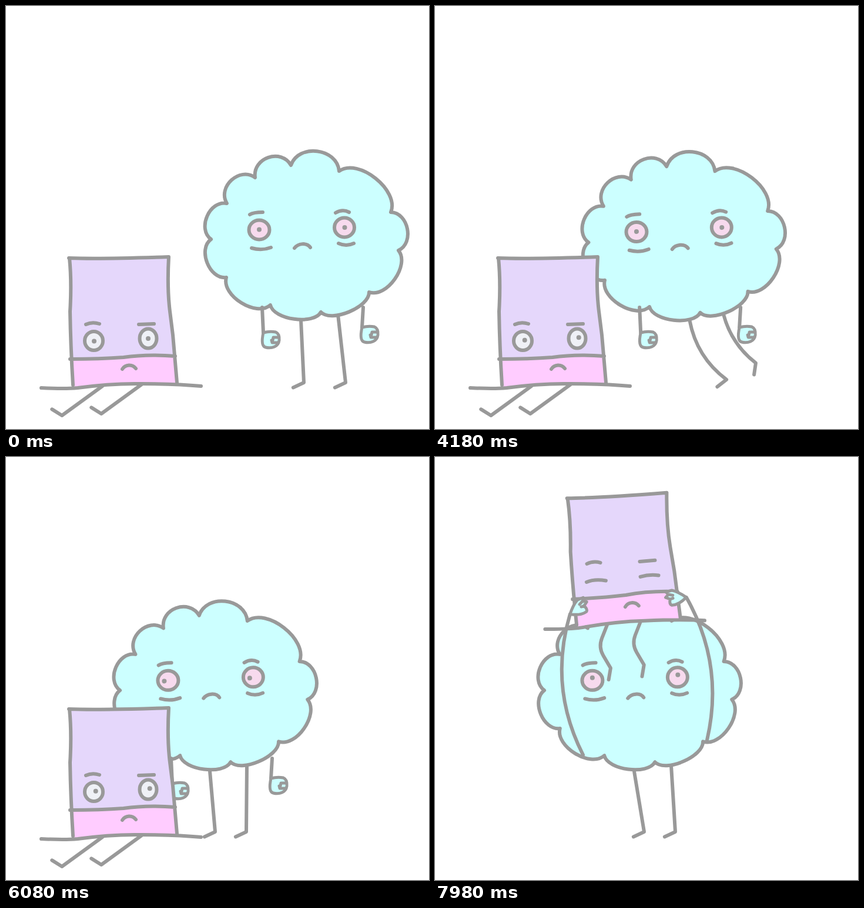
Animation, 720 px wide and 720 px high, one loop 8 s. Source, as an HTML page:

```html
<!DOCTYPE html>
<html lang="en">
<head>
<meta charset="utf-8">
<title>Cloud picks up hat</title>
<style>
  html, body { margin: 0; width: 100%; height: 100%; overflow: hidden; background: #fff; }
  svg { display: block; width: 100vw; height: 100vh; }
  path, ellipse { fill: none; stroke: #999; stroke-width: 6; stroke-linecap: round; stroke-linejoin: round; }
  .cloud, .hand { fill: #cff; }
  .hand { stroke-width: 5; }
  .felt { fill: #e5d7fb; stroke: none; }
  .band { fill: #fcf; stroke: none; }
  .eye circle { fill: #999; }
  .pink ellipse { fill: #f7daee; }
  .pale ellipse { fill: #eff1f6; }
</style>
</head>
<body>
<svg viewBox="0 0 720 720">
  <path id="leg0"/><path id="leg1"/>
  <g id="cloud">
    <path id="outline" class="cloud"/>
    <path d="M415 355Q421 351 437 351M561 352Q573 345 584 351M418 412Q435 417 451 411M566 404Q579 410 592 404M491 412C497 404 512 402 518 411"/>
    <g id="cloudOpen" class="eye pink">
      <ellipse cx="431" cy="381" rx="17.5" ry="16.5"/><ellipse cx="576" cy="377" rx="17" ry="16.5"/>
      <g id="cloudPupils"><circle cx="431" cy="380.5" r="4"/><circle cx="576.5" cy="377" r="4"/></g>
    </g>
    <path id="cloudShut" d="M413 387Q430 379 453 385M558 379Q580 370 601 381"/>
  </g>
  <path id="arm0"/>
  <g id="behind"></g>
  <g id="hat">
    <path id="hatLeg0"/><path id="hatLeg1"/>
    <path class="felt" d="M108 429L277 427Q273 480 279 520L288 596L240 595Q180 602 111 601Q107 520 108 429Z"/>
    <path class="band" d="M111 601Q180 602 240 595L287 596L291 642Q200 640 114 649Z"/>
    <path d="M107 429Q160 431 277 427Q274 480 279 520L284 560L291 641M108 429Q112 470 109 520Q110 580 114 645M109 601Q160 601 200 598Q240 592 288 596M60 650Q100 652 122 650Q180 642 230 643Q290 643 332 647"/>
    <path d="M136 542Q147 537 159 541M226 542L252 541M198 618C203 610 215 609 221 617"/>
    <g id="hatOpen" class="eye pale">
      <ellipse cx="149.5" cy="570" rx="15.5" ry="16"/><ellipse cx="242" cy="566" rx="14.5" ry="16.5"/>
      <g id="hatPupils"><circle cx="150" cy="570.5" r="4"/><circle cx="242" cy="566" r="4"/></g>
    </g>
    <path id="hatShut" d="M134 573Q148 568 167 572M226 568Q242 564 257 567"/>
  </g>
  <path id="arm1"/>
  <g id="front"><path id="hand1" class="hand"/><path id="hand0" class="hand"/></g>
</svg>
<script>
const LOOP = 8000, BEAT = 100, RAD = Math.PI / 180;
const FIST = 'M0 0Q-5 23 4 25Q12 27 19 24Q26 21 27 13Q28 2 21-1Q11-3 0 0ZM25 8H17L16 13M24 17H15L14 13';
const GRIP = 'M0 0Q-3 18-13 25Q-18 26-21 18L-29 20L-28 13L-34 12L-27 4Q-18 0 0 0ZM-21 18L-18 14M-28 13L-21 10';
// Notch x, y and height of the puff that follows it
const PUFFS = [[485,271,29], [567,281,29], [655,351,22], [668,416,23], [618,487,18], [536,521,18],
               [450,509,23], [375,462,21], [349,397,22], [376,336,24], [424,292,25]];
const GLANCES = [[720, 910], [2200, 2700], [5250, 5720], [5920, 6280]];
const CLOUD_BLINKS = [[1000, 1160], [3040, 3140], [4980, 5140]];
const HAT_BLINKS = [[1720, 1880], [7980, LOOP]];

const el = {};
document.querySelectorAll('[id]').forEach(e => el[e.id] = e);

const clamp = v => Math.max(0, Math.min(1, v));
const mix = (a, b, p) => a.map((v, i) => v + (b[i] - v) * p);
// Rises from 0 to 1 in n equal held steps, the first at time a
const ramp = (t, a, n) => clamp((Math.floor((t - a) / BEAT) + 1) / n);
const within = (spans, t) => spans.some(([a, b]) => t >= a && t < b);
const move = (e, x, y, more = '') => e.setAttribute('transform', `translate(${x} ${y}) ${more}`);

function drawOutline() {
  const d = PUFFS.map(([x, y, height], i) => {
    const [u, v] = PUFFS[(i + 1) % PUFFS.length];
    const k = height * 4 / 3 / Math.hypot(u - x, v - y), nx = (v - y) * k, ny = (x - u) * k;
    const [a, b] = [.1, .9].map(p => [x + (u - x) * p + nx, y + (v - y) * p + ny]);
    return `C${a} ${b} ${u} ${v}`;
  });
  el.outline.setAttribute('d', `M${PUFFS[0].slice(0, 2)}${d.join('')}Z`);
}

// A line from a to b, bent sideways; a smaller round gives a sharper joint
function limb(e, a, b, bend, round = 1, toe) {
  const [dx, dy] = [b[0] - a[0], b[1] - a[1]], k = bend / Math.hypot(dx, dy);
  const joint = [(a[0] + b[0]) / 2 + dy * k, (a[1] + b[1]) / 2 - dx * k];
  const tip = toe === undefined ? '' : `l${20 * Math.cos(toe * RAD)} ${20 * Math.sin(toe * RAD)}`;
  e.setAttribute('d', `M${a}L${mix(joint, a, round)}Q${joint} ${mix(joint, b, round)}L${b}${tip}`);
}

function drawEyes(name, x, y, shut) {
  el[name + 'Open'].style.display = shut ? 'none' : '';
  el[name + 'Shut'].style.display = shut ? '' : 'none';
  move(el[name + 'Pupils'], x, y);
}

function drawCloud(t, x, walk) {
  const walking = walk > 0 && walk < 1, there = walk === 1;
  const step = (walk * 18 - 10) * Math.PI / 4;
  const y = walking ? 1.5 * Math.cos(step) : there ? -1.5 : 0;
  move(el.cloud, x, y, `rotate(${walking ? -1.4 : there ? -.6 : 0} 510 390)`);

  for (const i of [0, 1]) {
    const phase = step + i * .86;
    const swing = walking ? 16 + 61 * Math.cos(phase) : 0;
    const lift = walking ? 39 * Math.max(0, Math.sin(phase)) : 0;
    const hip = [502 + 63 * i + x + swing / 4, 535 - 10 * i];
    // Feet stay planted after the walk
    const foot = there ? [356 + 53 * i, 638] : [507 + 71 * i + x + swing, 641 - swing / 15 - lift];
    limb(el['leg' + i], hip, foot, -.3 * swing, 1, 155 - .17 * swing - 1.6 * lift);
  }
}

function drawHat(x, y, tilt, fold) {
  move(el.hat, x, y, `rotate(${tilt} 200 645)`);
  const dangle = clamp(-y / 38);
  const angle = (144 - 28 * dangle - 28 * fold) * RAD, length = 85 - 11 * fold;
  for (const i of [0, 1]) {
    const hip = [164 - 5 * dangle + 7 * fold + (67 - 10 * fold) * i, 647 - 3 * i];
    const foot = [hip[0] + length * Math.cos(angle), hip[1] + length * Math.sin(angle)];
    limb(el['hatLeg' + i], hip, foot, 28 * dangle - 46 * fold, 1 - .6 * fold, 212 - 110 * fold);
  }
}

function drawArm(i, x, reach, lift, grip) {
  const side = i ? -1 : 1, holding = reach === 1;
  const slide = i * -30 * reach * (1 - lift);
  const shoulder = mix([436 + 172 * i + slide, 513], [415 + 211 * i, 507 - 25 * i], lift);
  shoulder[0] += x;
  const wrist = mix([438 + 168 * i + x, 556 - 9 * i], grip, reach);
  limb(el['arm' + i], shoulder, wrist, side * 48 * lift);
  const hand = el['hand' + i];
  hand.setAttribute('d', holding ? GRIP : FIST);
  const turn = i ? 34 * lift : -25 - 46 * lift;
  move(hand, ...wrist, holding ? `rotate(${turn}) scale(${-side} 1)` : '');
}

function draw(t) {
  const walk = ramp(t, 3280, 18), reach = ramp(t, 6280, 4), rise = ramp(t, 6620, 5);
  const lift = ramp(t, 7120, 2), settle = ramp(t, 7380, 4);

  const cloudX = -155 * clamp(1.02 * walk) - 8 * reach;
  drawCloud(t, cloudX, walk);

  const x = 127 * lift, tilt = -2.5 * lift;
  const y = -64 * rise ** 2.33 - 299 * lift - 22 * lift * (1 - settle);
  drawHat(x, y, tilt, lift * (.4 + .6 * settle));

  // Hands hold two points that travel with the hat
  const cos = Math.cos(tilt * RAD), sin = Math.sin(tilt * RAD);
  for (const i of [0, 1]) {
    const u = i ? 97 : -102, v = i ? -49 : -29;
    const grip = [200 + u * cos - v * sin + x + 6 * lift, 645 + u * sin + v * cos + y + 10 * lift];
    drawArm(i, cloudX, reach, lift, grip);
  }
  (reach === 1 ? el.front : el.behind).append(el.hand0);

  const gaze = GLANCES.reduce((sum, [a, b]) => sum + ramp(t, a, 2) - ramp(t, b, 2), 0);
  drawEyes('cloud', -6.5 * gaze, 1.5 * gaze - 4 * lift, within(CLOUD_BLINKS, t));
  const look = ramp(t, 1520, 4);
  drawEyes('hat', 2.7 * look, -1.7 * look, within(HAT_BLINKS, t));
}

drawOutline();
const start = performance.now();
function tick() {
  draw((performance.now() - start) % LOOP);
  requestAnimationFrame(tick);
}
tick();
</script>
</body>
</html>
```
